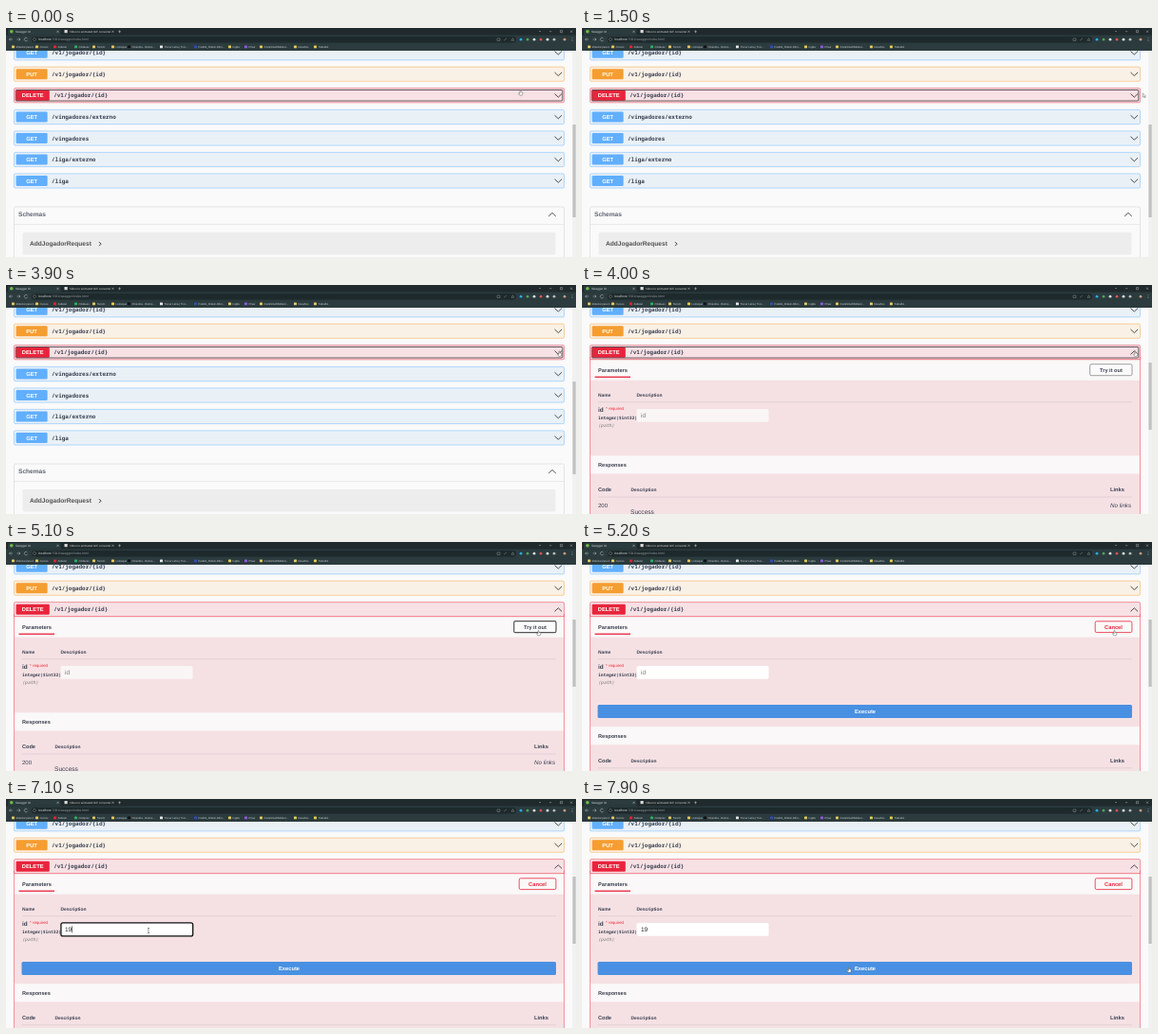
These frames come from a looping animation (600x242 px, 8000 ms). An HTML page:

```html
<!DOCTYPE html>
<html lang="pt">
<head>
<meta charset="utf-8">
<title>API docs</title>
<style>
html, body { margin: 0; width: 100%; height: 100%; overflow: hidden; background: #fafafa; }
svg { display: block; width: 100vw; height: 100vh; }
text { font-family: "Liberation Sans", Arial, sans-serif; fill: #3b4151; white-space: pre; text-rendering: geometricPrecision; }
.b { font-weight: 700; }
.m { font-family: "Noto Sans Mono", "DejaVu Sans Mono", monospace; }
.m.b { font-weight: 600; }
.i { font-style: italic; }
</style>
</head>
<body>
<svg id="stage" viewBox="0 0 600 242" xmlns="http://www.w3.org/2000/svg"></svg>
<script>
const stage = document.getElementById('stage');
const LOOP = 8000, OPEN = 4000, HOVER = 4900, PRESS = 5100, EDIT = 5200, FOCUS = 5800, BLUR = 7800;
const RED = '#e9243c', PINK = '#f5e1e4', BLUE = '#61affe', ORANGE = '#f59d30';

const attrs = o => Object.entries(o).map(([k, v]) => ` ${k}="${v}"`).join('');
const rect = (x, y, w, h, fill, o = {}) =>
  `<rect${attrs({ x, y, width: w, height: h, fill, ...o })}/>`;
const path = (d, stroke, width = 1, o = {}) =>
  `<path${attrs({ d, stroke, 'stroke-width': width, fill: 'none', ...o })}/>`;
const dot = (x, y, r, fill) => `<circle${attrs({ cx: x, cy: y, r, fill })}/>`;
const text = (x, y, size, str, cls = '', o = {}) =>
  `<text${attrs({ x, y, 'font-size': size, class: cls, ...o })}>${str}</text>`;
const group = (id, body) => `<g id="${id}">${body}</g>`;
const middle = { 'text-anchor': 'middle' };
const white = { ...middle, style: 'fill:#fff' };
const tint = c => ({ style: `fill:${c}` });

function chevron(y, up, x = 581.3) {
  const s = up ? -1 : 1;
  return path(`M${x - 3.8} ${y - 1.8 * s}l3.8 ${3.6 * s}l3.8 ${-3.6 * s}`, '#222', .8);
}

function row(y, method, url, color, bg) {
  const wide = method === 'DELETE' ? 2.2 : 0;
  return rect(8.5, y - 7.6, 579, 15.2, bg, { rx: 1.3, stroke: color, 'stroke-width': .45 }) +
    rect(10.6, y - 5.5, 33 + wide, 11, color, { rx: 1.2 }) +
    text(27.1 + wide / 2, y + 2.1, 5.75, method, 'b', white) +
    text(48 + wide, y + 2, 5.95, url, 'b m');
}

const get = (y, url) => row(y, 'GET', url, BLUE, '#e9f1f7') + chevron(y);

function list() {
  const rows = ['/vingadores/externo', '/vingadores', '/liga/externo', '/liga']
    .map((url, i) => get(94 + i * 22.5, url)).join('');
  return rows + chevron(71.3) +
    rect(8.5, 189, 579, 60, '#fafafa', { rx: 1.5, stroke: '#cfcfd2', 'stroke-width': .5 }) +
    path('M8.5 207.5H587.5', '#d8d8da', .5) +
    text(13, 199.3, 6.6, 'Schemas', 'b', tint('#606470')) + chevron(197.2, true, 575) +
    rect(17.5, 216, 561, 23.5, '#ededed', { rx: 1.5 }) +
    text(25, 229.8, 6.6, 'AddJogadorRequest', 'b', tint('#505050')) +
    path('M98 226.2l2 2l-2 2', '#222', .9);
}

function details() {
  return rect(8.5, 78.8, 579, 170, PINK) +
    path('M8.5 76V245M587.5 76V245M8.5 78.9H587.5', RED, .45) +
    rect(9, 79.4, 578, 21.3, '#faf8f8') +
    text(17, 91.6, 5.7, 'Parameters', 'b') +
    rect(13.5, 96.6, 37.5, 1.3, RED) +
    text(17, 117.7, 4.9, 'Name', 'b') + text(57.5, 117.7, 4.9, 'Description', 'b') +
    path('M17 123.7H579', '#cdbfc4', .5) +
    text(17, 134, 6.4, 'id', 'b') + text(25, 132, 4.4, '* required', '', tint('#f02c3c')) +
    text(17, 142.3, 4.55, 'integer($int32)', 'b m') +
    text(17, 149.8, 4.7, '(path)', 'm i', tint('#777')) +
    rect(57.5, 131, 139, 13.7, '#fff', { rx: 1.5, id: 'field' }) +
    `<text id="value" x="62" y="140" font-size="6.5"></text>` +
    path('M62.3 134.3V141.3', '#111', .6, { id: 'caret' }) +
    rect(57.9, 130.8, 138.8, 14.1, 'none', { rx: 2, stroke: '#111', 'stroke-width': 1.3, id: 'ring' }) +
    chevron(71.6, true) +
    group('tryButton',
      rect(534.7, 83.7, 44.3, 12, '#fbfbfb', { rx: 1.5, stroke: '#888', 'stroke-width': .8, id: 'tryBox' }) +
      text(557, 91.7, 5.65, 'Try it out', 'b', middle)) +
    group('editControls',
      rect(540.2, 83.8, 38.7, 11.8, '#fbf8f8', { rx: 1.5, stroke: RED, 'stroke-width': .8 }) +
      text(559.5, 91.7, 5.75, 'Cancel', 'b', { ...middle, style: `fill:${RED}` }) +
      rect(16.5, 172, 562.5, 14, '#4990e2', { rx: 1.5 }) +
      text(298, 181.1, 5.75, 'Execute', 'b', white)) +
    group('responses',
      rect(9, 180.3, 578, 19.2, '#faf8f8') +
      text(17, 192, 5.6, 'Responses', 'b') +
      text(17, 218.3, 5.6, 'Code', 'b') + text(51.5, 218.2, 4.9, 'Description', 'b') +
      text(556, 218.3, 5.7, 'Links', 'b') +
      path('M17 224H579', '#cdbfc4', .5) +
      text(17, 234.7, 6, '200') + text(51, 241.6, 6.6, 'Success') +
      text(556, 234.7, 6.2, 'No links', 'i'));
}

function browser() {
  const pale = tint('#d5d7d9'), folder = '#e8c75a', bar = '#2b3b3e';
  const marks = [
    [6, 'Material para tr...', folder], [31, 'Cursos', folder], [50, 'Zubelar', '#e22'],
    [72, 'Ondavex', '#27b35a'], [91, 'Torrent', folder], [111, 'Lomeque', folder],
    [128, 'Olvendra - Retros...', '#111'], [162, 'Trocar Letra | Troc...', '#e6e6e6'],
    [198, 'Pedido_Ordem-Difer...', '#2b50b0'], [234, 'Inglês', folder], [251, 'Plivar', '#9355e8'],
    [267, 'CodeSmell/Refator...', folder], [303, 'Desafios', folder], [324, 'Trabalho', folder]
  ];
  const tools = [['#35a5d8', 542], ['#4aa852', 549], ['#ddd', 556], ['#d65355', 563],
    ['#e4e4e4', 570], ['#bbb', 577], ['#c99a80', 588]];
  return rect(0, 0, 600, 24, bar) + rect(0, 0, 600, 7.5, '#202a2c') +
    path('M2 7.6V2.5Q2 1 3.5 1H56Q57.5 1 57.5 2.5V7.6Z', 'none', 0, { fill: bar }) +
    dot(5.8, 3.8, 1.8, '#6bbf3b') + text(10, 4.8, 3.1, 'Swagger UI', '', pale) +
    path('M53.5 2.8l2 2m0-2l-2 2M111.5 2.8l2 2m0-2l-2 2M118 3.8h3m-1.5-1.5v3', '#c7c9cb', .5) +
    rect(61.5, 2, 3.2, 3.2, '#d8d8d8') + text(67, 4.8, 3, 'Video to animated GIF converter', '', pale) +
    path('M561 3l1 1l1-1M572 3.7h2.4M583.5 2.6h2.2v2.2h-2.2zM594 2.6l2.2 2.2m0-2.2l-2.2 2.2', '#d0d2d4', .4) +
    rect(27, 8.9, 510, 6.6, '#1d292b', { rx: 3.3 }) +
    path('M7 12H3.5l1.5-1.5M3.5 12l1.5 1.5M11.5 12H15l-1.5-1.5M15 12l-1.5 1.5M22.5 11a1.8 1.8 0 1 0 .2 1.8', '#c4c7ca', .5) +
    path('M30 10.5a1.5 1.5 0 1 0 .1 0M517 11h3v2.5h-3zM524 13.3l3-2.5M533.5 10.7l1.4 2.6h-2.8z', '#aaa', .4) +
    text(34, 13.2, 3.45, 'localhost<tspan style="fill:#91969b">:7001/swagger/index.html</tspan>', '', pale) +
    tools.map(([c, x]) => dot(x, 12.2, 1.4, c)).join('') +
    [10.7, 12.2, 13.7].map(y => dot(596, y, .4, '#ddd')).join('') +
    marks.map(([x, label, c]) => rect(x, 18.6, 3, 2.7, c, { rx: .4 }) +
      text(x + 4.6, 21, 2.75, label, '', pale)).join('');
}

stage.innerHTML = rect(0, 0, 600, 242, '#fafafa') +
  get(26.3, '/v1/jogador/{id}') +
  row(48.7, 'PUT', '/v1/jogador/{id}', ORANGE, '#faf1e6') + chevron(48.7) +
  row(71.2, 'DELETE', '/v1/jogador/{id}', RED, '#f7e1e5') +
  group('list', list()) + group('details', details()) +
  rect(10.2, 65.5, 575.6, 11.5, 'none', { rx: .8, stroke: '#2b1a20', 'stroke-width': .7, id: 'rowFocus' }) +
  rect(596, 24, 4, 218, '#f1f1f1') + rect(596.5, 102, 3.2, 98, '#c1c1c1', { id: 'thumb' }) +
  browser() +
  group('arrow', path('M0 0V4.2L1 3.3L1.7 4.8L2.4 4.5L1.8 3H3.1Z', '#333', .35, { fill: '#fff' })) +
  group('hand', path('M-.5 0Q0-.5.4 0V1.8L2.3 2.2V3.8L1.7 5.3H-.8L-2 3.3L-1.6 2.8L-.5 3.5Z', '#333', .4, { fill: '#fff' })) +
  group('beam', path('M-1-2.5H1M0-2.5V2.5M-1 2.5H1', '#333', .5));

const el = id => document.getElementById(id);
const show = (id, on) => el(id).setAttribute('display', on ? 'inline' : 'none');

// Pointer stops: time, x, y
const stops = [
  [0, 541.5, 65.8], [900, 585, 68], [1400, 590.5, 69], [3000, 590.5, 69], [3200, 589.5, 69.3],
  [3500, 589, 69.5], [3800, 582.5, 70], [4500, 582.5, 70], [5000, 560.5, 93.5], [5200, 560.5, 93.5],
  [5800, 144, 138.5], [6100, 144, 138.5], [6800, 150, 139], [7200, 150, 139],
  [7700, 281, 178], [8000, 281, 178]
];

function pointer(t) {
  const n = stops.findIndex(s => s[0] > t);
  const [t0, x0, y0] = stops[n - 1], [t1, x1, y1] = stops[n];
  const p = (t - t0) / (t1 - t0), e = p * p * (3 - 2 * p);
  return [x0 + (x1 - x0) * e, y0 + (y1 - y0) * e];
}

function cursorKind(x, y, t) {
  if (x > 57 && x < 197 && y > 131 && y < 145 && t >= OPEN) return 'beam';
  const onRow = x < 587 && y > 64 && y < 79;
  const onButton = t >= OPEN && x > 535 && x < 579 && y > 83 && y < 96;
  const onExecute = t >= EDIT && x < 579 && y > 172 && y < 186;
  return onRow || onButton || onExecute ? 'hand' : 'arrow';
}

function render(time) {
  const t = Math.floor((time % LOOP) / 100) * 100;
  const open = t >= OPEN, edit = t >= EDIT, focus = t >= FOCUS && t < BLUR;
  const typed = t < 7000 ? '' : t < 7100 ? '1' : '19';

  show('list', !open);
  show('details', open);
  show('rowFocus', t < PRESS);
  show('tryButton', !edit);
  show('editControls', edit);
  el('tryBox').setAttribute('stroke', t >= HOVER ? '#555' : '#888');
  el('tryBox').setAttribute('stroke-width', t >= HOVER ? 1.2 : .8);
  el('responses').setAttribute('transform', `translate(0 ${edit ? 14.8 : 0})`);
  el('thumb').setAttribute('y', open ? 82 : 102);
  el('thumb').setAttribute('height', open ? 71 : 98);

  el('field').setAttribute('fill', edit ? '#fff' : '#faf6f6');
  el('value').textContent = typed || 'id';
  el('value').style.fill = typed ? '#222' : '#777';
  show('ring', focus);
  const blinkStart = typed ? 7100 : FOCUS;
  show('caret', focus && Math.floor(Math.max(0, t - blinkStart) / 500) % 2 === 0);
  el('caret').setAttribute('transform', `translate(${typed.length * 3.6} 0)`);

  const [x, y] = pointer(t), kind = cursorKind(x, y, t);
  for (const id of ['arrow', 'hand', 'beam']) show(id, id === kind);
  el(kind).setAttribute('transform', `translate(${x} ${y})`);
}

const start = performance.now();
function tick() {
  render(performance.now() - start);
  requestAnimationFrame(tick);
}
tick();
</script>
</body>
</html>
```
